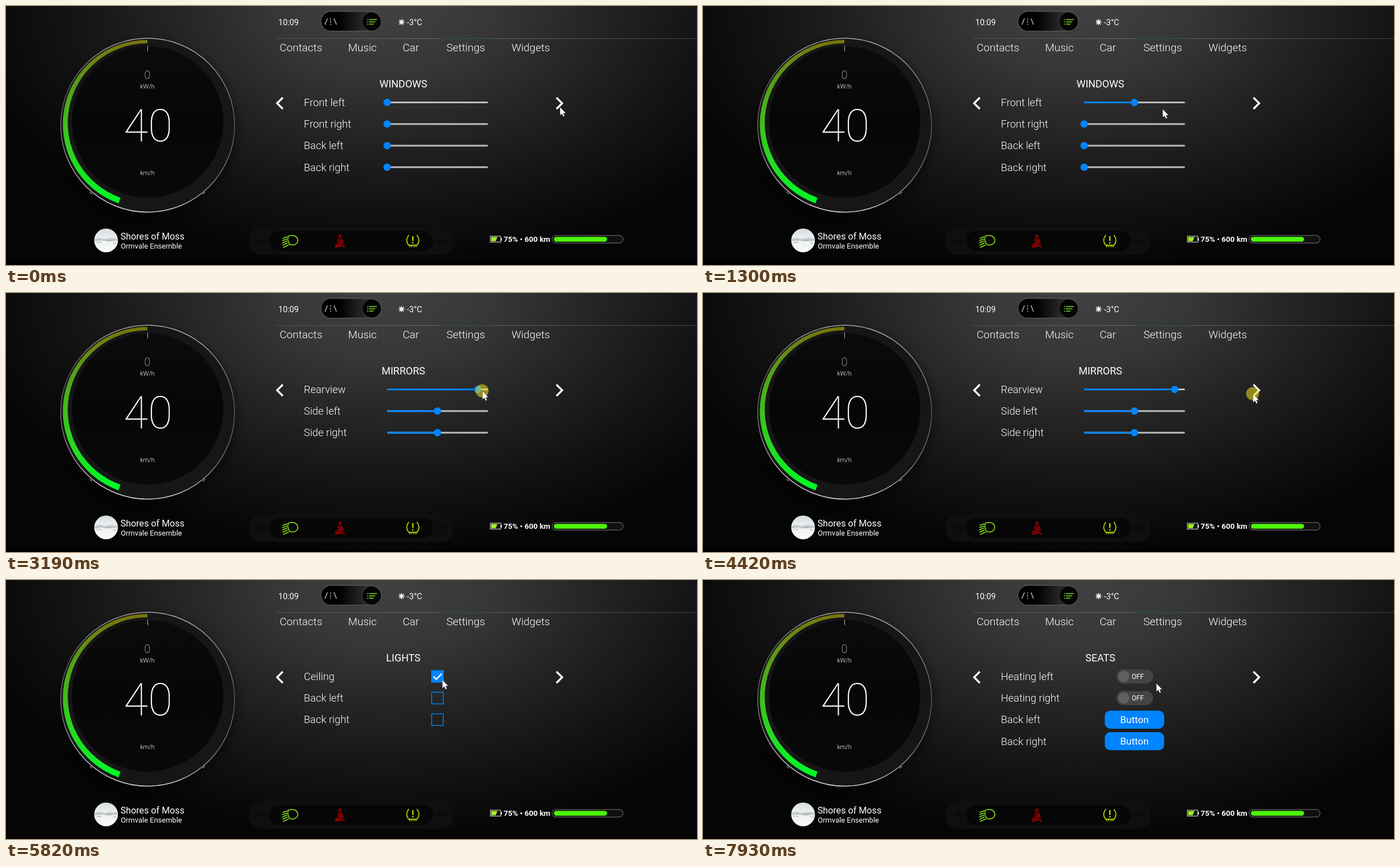
Write an HTML page that moves like this. It is 1222x458 px and loops after 8 s.

```html
<!DOCTYPE html>
<html lang="en">
<head>
<meta charset="utf-8">
<title>Car dashboard</title>
<style>
html, body { margin: 0; width: 100%; height: 100%; overflow: hidden; background: #000; }
svg { display: block; width: 1222px; height: 458px; font-family: Roboto, sans-serif; }
text { fill: #fff; }
.mid { text-anchor: middle; }
.tab { font-size: 19px; font-weight: 300; fill: #e6e6e6; }
.label { font-size: 18.4px; font-weight: 300; }
.title { font-size: 18px; text-anchor: middle; }
.chev { fill: none; stroke: #fff; stroke-width: 3.4; }
.ln { fill: none; stroke-width: 1.5; }
</style>
</head>
<body>
<svg viewBox="0 0 1222 458">
  <defs>
    <radialGradient id="bg" gradientUnits="userSpaceOnUse" cx="0" cy="0" r="1" gradientTransform="translate(670 0) scale(750 460)">
      <stop offset="0" stop-color="#414141"/><stop offset=".25" stop-color="#373737"/>
      <stop offset=".5" stop-color="#242424"/><stop offset=".75" stop-color="#131313"/><stop offset="1" stop-color="#050505"/>
    </radialGradient>
    <linearGradient id="ring" x1=".6" y1="0" x2=".4" y2="1">
      <stop offset="0" stop-color="#aaa"/><stop offset=".4" stop-color="#555"/>
      <stop offset=".7" stop-color="#777"/><stop offset="1" stop-color="#ddd"/>
    </linearGradient>
    <linearGradient id="power" x1="0" y1="0" x2="0" y2="1">
      <stop offset="0" stop-color="#7a7310"/><stop offset=".3" stop-color="#56a018"/>
      <stop offset=".65" stop-color="#30d020"/><stop offset="1" stop-color="#00fa28"/>
    </linearGradient>
    <linearGradient id="disc" x1="0" y1="0" x2="0" y2="1">
      <stop offset="0" stop-color="#0b0b0b"/><stop offset=".5" stop-color="#060606"/><stop offset="1" stop-color="#090909"/>
    </linearGradient>
    <linearGradient id="pill"><stop offset=".3" stop-color="#000"/><stop offset="1" stop-color="#454545"/></linearGradient>
    <linearGradient id="rule" gradientUnits="userSpaceOnUse" x1="477" y1="0" x2="1222" y2="0">
      <stop offset="0" stop-color="#505050"/><stop offset=".4" stop-color="#6a6a6a"/><stop offset="1" stop-color="#4a4a4a"/>
    </linearGradient>
    <linearGradient id="cover" x1="0" y1="0" x2="0" y2="1">
      <stop offset="0" stop-color="#d3dcdf"/><stop offset=".45" stop-color="#eef1f1"/><stop offset="1" stop-color="#fafafa"/>
    </linearGradient>
    <filter id="blur" x="-20%" y="-20%" width="140%" height="140%"><feGaussianBlur stdDeviation="9"/></filter>
    <clipPath id="round"><circle cx="177" cy="414.500" r="21"/></clipPath>
  </defs>
  <rect width="1222" height="458" fill="url(#bg)"/>
  <rect y="454" width="1222" height="4" fill="#000"/>

  <!-- gauge -->
  <circle cx="252" cy="217" r="155" fill="#000" opacity=".5" filter="url(#blur)"/>
  <circle cx="250.500" cy="210.700" r="153.800" fill="#161616" stroke="url(#ring)" stroke-width="1.500"/>
  <path d="M148 329l4 4M352 329l-4 4" stroke="#888" stroke-width="1.500"/>
  <circle cx="250.500" cy="205" r="134" fill="url(#disc)"/>
  <path d="M250 60A148.900 148.900 0 0 0 199 349L202.500 339A140.600 140.600 0 0 1 250 66Z" fill="url(#power)"/>
  <path d="M250.500 70V80" stroke="#bbb"/>
  <g class="mid">
    <text x="250" y="129" font-size="20" font-weight="100">0</text>
    <text x="250" y="145.500" font-size="11" font-weight="300">kW/h</text>
    <text x="251.200" y="239" font-size="79" font-weight="100">40</text>
    <text x="250" y="299" font-size="11" font-weight="300">km/h</text>
  </g>

  <!-- top bar -->
  <text x="481.500" y="34" font-size="14.500">10:09</text>
  <text x="709" y="34" font-size="14.500">-3°C</text>
  <path d="M699.500 23V34M694 28.500H705.500M695.500 24.500l8 8M703.500 24.500l-8 8" stroke="#fff" stroke-width="1.200"/>
  <circle cx="699.500" cy="28.500" r="3" fill="none" stroke="#fff"/>
  <rect x="557" y="9.500" width="106.500" height="35" rx="17.500" fill="url(#pill)" stroke="#555" stroke-width="1.300"/>
  <circle cx="647" cy="27.500" r="16" fill="#050505"/>
  <path d="M568.500 22L564 33M580 22L584.500 33M574 22v2.500M574 26.500v3M574 31.500v2" stroke="#ccc" stroke-width="1.300"/>
  <path d="M642 24H656M642 28H653M642 32H650M638.500 24h2M638.500 28h2M638.500 32h2" stroke="#7fe02a" stroke-width="1.700"/>
  <path d="M477 57.500H1222" stroke="url(#rule)"/>
  <path d="M765 57.500H862" stroke="#2f5f2f"/>
  <g class="tab">
    <text x="484" y="80">Contacts</text><text x="605" y="80">Music</text><text x="701.500" y="80">Car</text>
    <text x="779" y="79.500">Settings</text><text x="894" y="80">Widgets</text>
  </g>

  <!-- bottom bar -->
  <g clip-path="url(#round)">
    <rect x="155" y="393" width="44" height="44" fill="url(#cover)"/>
    <path d="M155 412l10-2 9 2 12-2 14 2v3l-16 1-14-1-15 1z" fill="#c2c8c9"/>
    <path d="M160 418h9M176 415h11M189 419h6" stroke="#9ca0a0"/>
  </g>
  <text x="202.500" y="413" font-size="16.200">Shores of Moss</text>
  <text x="203" y="429" font-size="13">Ormvale Ensemble</text>
  <rect x="429" y="391" width="362" height="49" rx="22" fill="#0f0f0f"/>
  <rect x="466" y="398" width="289" height="35" rx="16" fill="#060606"/>
  <path d="M445 415l7-6v4h8v5h-8v4zM777 415l-7-6v4h-8v5h8v4z" fill="#0a0a0a"/>
  <g class="ln" stroke="#8fe81c">
    <path d="M500 406.500C511 404 516 409 516 414.500S510 424 502 422Q496 414 500 406.500Z"/>
    <path d="M498 408l-9 3M497 412l-8.500 3M497 415.500l-8.500 3.500M498 419l-9 4M500 422.500l-10 4.500"/>
  </g>
  <g fill="#860000">
    <circle cx="590.500" cy="407" r="2.900"/>
    <path d="M587 411h6q3 1 3.500 6l1 4-2 .5-2-4v4h-7l-4 2-1-1.500 4-3z"/>
    <path d="M585 422h9l6 3.500-1.500 2-6-2.500-3 1.500-8 1-.5-2z"/>
  </g>
  <path d="M593 411l-8 10" stroke="#060606" stroke-width="1.200"/>
  <g class="ln" stroke="#c4f000">
    <path d="M712.500 405Q705 414 712 423H727Q734 414 726.500 405M714 423v3.500M717.500 423v3.500M721.500 423v3.500M725 423v3.500"/>
    <path d="M719.500 407V415.500M719.500 417.500V420" stroke-width="2.200"/>
  </g>
  <rect x="856.500" y="407" width="18.500" height="10.500" fill="#141414" stroke="#ddd"/>
  <path d="M876 410v5" stroke="#ddd" stroke-width="2"/>
  <path d="M858 408.500H869L866 416H858Z" fill="#a0ee20"/>
  <text x="880" y="417" font-size="13.500" font-weight="700">75% • 600 km</text>
  <rect x="965.700" y="405.700" width="125.600" height="13.600" rx="6.800" fill="#101010" stroke="#555" stroke-width="1.400"/>
  <rect x="969" y="408.300" width="94" height="8.400" rx="4.200" fill="#4df50a"/>

  <path class="chev" d="M489.500 162L479.500 172L489.500 182M973.500 162L983.500 172L973.500 182"/>
  <g id="page"></g>
  <circle id="press" r="11.500" fill="#e6d71e" fill-opacity=".58"/>
  <path id="cursor" d="M.8 .8V15.400L4.100 12.300L6.400 17.600L8.800 16.600L6.500 11.500H11Z" fill="#fff" stroke="#000" stroke-opacity=".45" stroke-width=".5"/>
</svg>
<script>
const LOOP = 8000, BLUE = '#0084ff';
const $ = id => document.getElementById(id);
const rowY = i => 170.5 + i * 38.2;

// start, end, steps, x, y, dip of the curve
const moves = [
  [70, 690, 10, 763, 171, 14.5],
  [1230, 1990, 12, 975, 178, 20.5],
  [2510, 2990, 8, 842, 173, 9.5],
  [3590, 4350, 12, 972, 178, 15.5],
  [4880, 5490, 10, 771, 176, 14],
  [6090, 6840, 12, 974, 181, 24.5],
  [6920, 6920, 1, 975, 182, 0],
  [7520, 7930, 7, 801, 182, 6]
];
const presses = [[830, 1030], [2120, 2250], [3190, 3330], [4420, 4550], [5690, 5820], [7040, 7190]];

function slider(y, v) {
  const x = 674 + 178 * v;
  return `<path d="M674 ${y}H852" stroke="#bdbdbd" stroke-width="3"/>
    <path d="M674 ${y}H${x}" stroke="${BLUE}" stroke-width="3"/>
    <circle cx="${x}" cy="${y}" r="6.5" fill="${BLUE}"/>`;
}

function checkbox(y, on) {
  return `<rect x="752.7" y="${y - 10.3}" width="20.6" height="20.6" fill="${on ? BLUE : 'none'}" stroke="${BLUE}" stroke-width="1.4"/>` +
    (on ? `<path d="M756 ${y}l5 5 9.5-10" fill="none" stroke="#fff" stroke-width="2.4"/>` : '');
}

function toggle(y) {
  return `<rect x="731" y="${y - 12.5}" width="65" height="25" rx="12.5" fill="#444"/>
    <circle cx="744" cy="${y}" r="10" fill="#5f5f5f"/>
    <text class="mid" x="769" y="${y + 4}" font-size="12">OFF</text>`;
}

function button(y) {
  return `<rect x="710.5" y="${y - 16}" width="105" height="32" rx="10" fill="${BLUE}"/>
    <text class="mid" x="763" y="${y + 6}" font-size="17.2">Button</text>`;
}

function panel(title, rows) {
  return `<text class="title" x="702.7" y="144">${title}</text>` + rows.map(([name, draw, value], i) =>
    `<text class="label" x="526.8" y="${rowY(i) + 6.5}">${name}</text>` + draw(rowY(i), value)).join('');
}

function pageAt(t) {
  if (t < 2250) return panel('WINDOWS', [
    ['Front left', slider, t < 930 ? 0 : .5], ['Front right', slider, 0],
    ['Back left', slider, 0], ['Back right', slider, 0]]);
  if (t < 4550) return panel('MIRRORS', [
    ['Rearview', slider, t < 3190 ? .5 : .9], ['Side left', slider, .5], ['Side right', slider, .5]]);
  if (t < 7190) return panel('LIGHTS', [
    ['Ceiling', checkbox, t >= 5820], ['Back left', checkbox], ['Back right', checkbox]]);
  return panel('SEATS', [
    ['Heating left', toggle], ['Heating right', toggle], ['Back left', button], ['Back right', button]]);
}

function cursorAt(t) {
  let x = 979, y = 178;
  for (const [start, end, steps, toX, toY, dip] of moves) {
    if (t < start) break;
    const gap = (end - start) / (steps - 1) || 1;
    const p = Math.min(1, (Math.floor((t - start) / gap + 1e-6) + 1) / steps);
    const e = 1 - (1 - p) ** 1.45;
    x += (toX - x) * e;
    y += (toY - y) * e + dip * Math.sin(Math.PI * e) ** 2;
  }
  return [x, y];
}

let shown = '';
function draw(t) {
  const html = pageAt(t);
  if (html !== shown) $('page').innerHTML = shown = html;
  const at = `translate(${cursorAt(t).map(v => v.toFixed(1))})`;
  $('cursor').setAttribute('transform', at);
  $('press').setAttribute('transform', at);
  $('press').style.display = presses.some(([a, b]) => t >= a && t < b) ? '' : 'none';
}

const begin = performance.now();
function tick() {
  draw((performance.now() - begin) % LOOP);
  requestAnimationFrame(tick);
}
tick();
</script>
</body>
</html>
```
